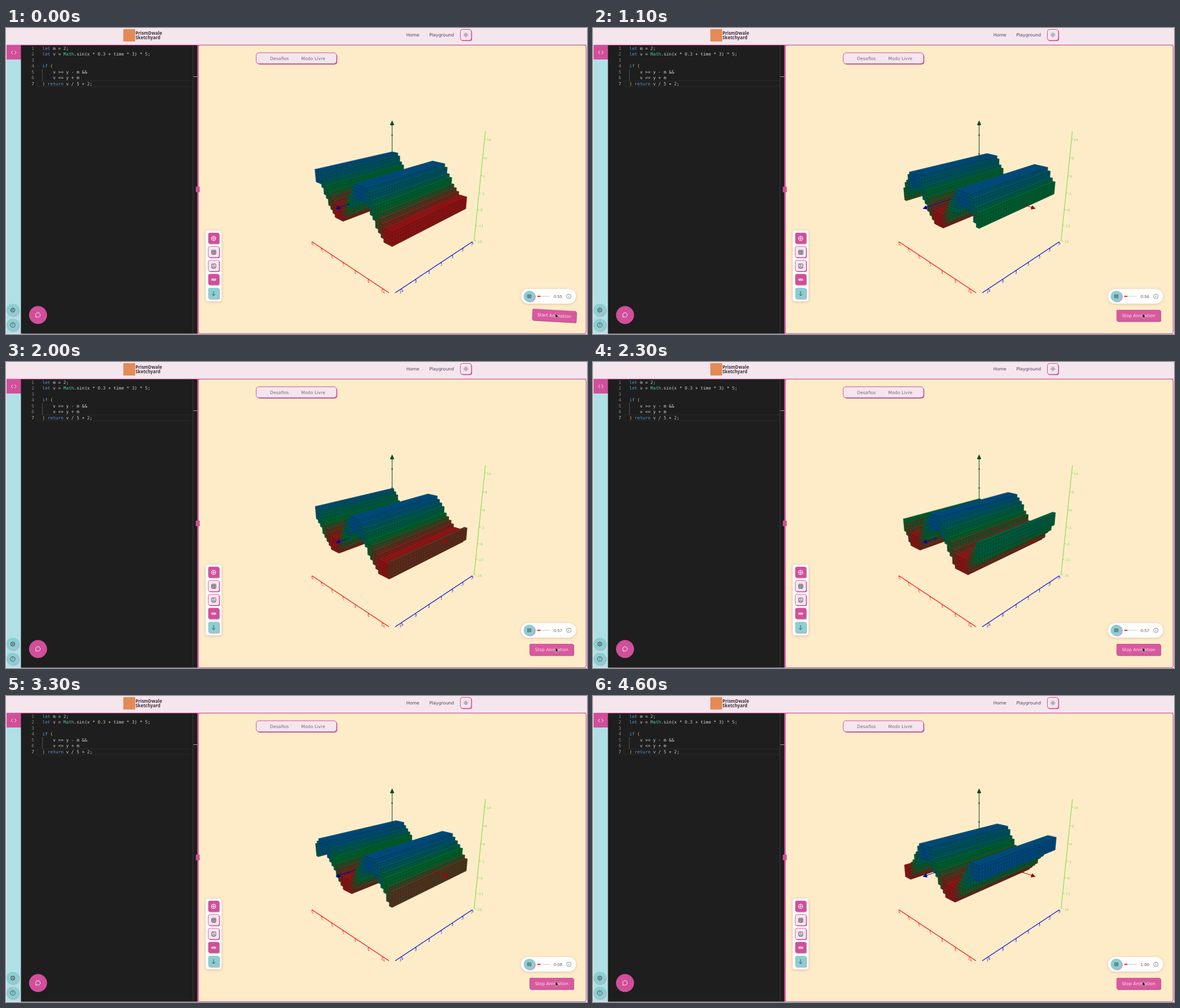
Write an HTML page with a canvas that moves like this. It is 1030 px wide and 544 px high and loops after 4.8 s.

```html
<!DOCTYPE html>
<html lang="pt">
<head>
<meta charset="utf-8">
<title>Voxel wave</title>
<style>
html, body { margin: 0; width: 100%; height: 100%; overflow: hidden; background: #f5e6ee; }
canvas { display: block; width: 1030px; height: 544px; }
</style>
</head>
<body>
<canvas id="stage" width="1030" height="544"></canvas>
<script>
const W = 1030, H = 544, LOOP = 4800;
const PINK = '#d14f9a', PALE = '#f5e6ee', TEAL = '#8acfd1', CREAM = '#feecc8', INK = '#4b414e';
const SANS = '"DejaVu Sans", sans-serif', MONO = '"DejaVu Sans Mono", monospace';
const stage = document.getElementById('stage').getContext('2d');
let g = stage;

// ---------- 2D helpers ----------
function box(x, y, w, h, r, fill, stroke, lw = 1) {
  g.beginPath();
  g.roundRect(x, y, w, h, r);
  if (fill) { g.fillStyle = fill; g.fill(); }
  if (stroke) { g.strokeStyle = stroke; g.lineWidth = lw; g.stroke(); }
}
function disc(x, y, r, fill, stroke, lw = 1) {
  g.beginPath();
  g.arc(x, y, r, 0, 7);
  if (fill) { g.fillStyle = fill; g.fill(); }
  if (stroke) { g.strokeStyle = stroke; g.lineWidth = lw; g.stroke(); }
}
function line(color, lw, ...pts) {
  g.beginPath();
  pts.forEach((p, i) => i ? g.lineTo(p[0], p[1]) : g.moveTo(p[0], p[1]));
  g.strokeStyle = color;
  g.lineWidth = lw;
  g.stroke();
}
function poly(fill, ...pts) {
  g.beginPath();
  pts.forEach(p => g.lineTo(p[0], p[1]));
  g.closePath();
  g.fillStyle = fill;
  g.fill();
}
function text(s, x, y, color, size = 7.8, align = 'center', font = SANS, weight = '') {
  g.font = `${weight} ${size}px ${font}`;
  g.textAlign = align;
  g.textBaseline = 'alphabetic';
  g.fillStyle = color;
  g.fillText(s, x, y);
}
function shadow(color, blur, dx, dy) {
  g.shadowColor = color; g.shadowBlur = blur;
  g.shadowOffsetX = dx; g.shadowOffsetY = dy;
}
const noShadow = () => shadow('transparent', 0, 0, 0);

// ---------- camera ----------
const F = 549, D = 95.85, S = 0.343, C = 0.939, R = Math.SQRT1_2;
function P(x, y, z) {
  const u = (x - z) * R, w = (x + z) * R, k = F / (D - w * C - y * S);
  return [684.5 + u * k, 287 - (y * C - w * S) * k];
}

// ---------- rulers ----------
const END = 18, OFF = 19.1, UNIT = 1.125;
function label(s, at, right, up, color) {
  const a = P(...at), b = P(...right), c = P(...up);
  g.save();
  g.transform((b[0] - a[0]) / 10, (b[1] - a[1]) / 10, (a[0] - c[0]) / 10, (a[1] - c[1]) / 10, a[0], a[1]);
  text(s, 0, 0, color, 11);
  g.restore();
}
function rulers() {
  const red = '#ff1010', blue = '#1010d8', green = '#8ee05a';
  line(red, 1.3, P(-END, -END, OFF), P(END, -END, OFF));
  line(blue, 1.3, P(OFF, -END, END), P(OFF, -END, -END));
  line(green, 1.3, P(OFF, -END, -OFF), P(OFF, END, -OFF));
  for (let n = -16; n <= 14; n += 5) {
    const q = n * UNIT, y = -END - 1.25;
    line(red, 1, P(q, -END, OFF), P(q, -END - 0.5, OFF));
    label(n, [q, y, OFF], [q + 1, y, OFF], [q, y + 1, OFF], red);
    line(blue, 1, P(OFF, -END, q), P(OFF, -END - 0.5, q));
    label(n, [OFF, y, q], [OFF, y, q - 1], [OFF, y + 1, q], blue);
    const p = P(OFF, q, -OFF);
    line(green, 1, p, [p[0] + 3, p[1] + 0.6]);
    text(n, p[0] + 3.5, p[1] + 3.6, green, 6.4, 'left');
  }
}

// ---------- interface ----------
function code() {
  const base = '#d4d4d4', key = '#569cd6', num = '#b5cea8', cls = '#4ec9b0', par = '#e8c35a';
  const rows = [
    [['let', key], [' m = '], ['2', num], [';']],
    [['let', key], [' v = '], ['Math', cls], ['.sin(x * '], ['0.3', num], [' + time * '], ['3', num], [') * '], ['5', num], [';']],
    [],
    [['if', key], [' '], ['(', par]],
    [['    v >= y - m &&']],
    [['    v <= y + m']],
    [[')', par], [' '], ['return', key], [' v / '], ['5', num], [' + '], ['2', num], [';']]
  ];
  box(55, 94, 276, 10, 0, null, '#2b2b2b');
  line('#505050', 1, [64.5, 73], [64.5, 94]);
  rows.forEach((row, i) => {
    const y = 38.7 + i * 10.55;
    text(i + 1, 50, y, i === 6 ? '#c6c6c6' : '#858585', 7.76, 'right', MONO);
    let x = 64.5;
    for (const [s, color = base] of row) {
      text(s, x, y, color, 7.76, 'left', MONO);
      x += g.measureText(s).width;
    }
  });
  line('#3a3a3a', 1, [331.5, 31], [331.5, 543]);
  line('#a8a8a8', 1, [332, 86.5], [339, 86.5]);
}
function tool(y, fill) {
  const pale = fill === PALE;
  box(359.7, y - 8.8, 19.5, 19.5, 3, pale ? PINK : '#b9acc0');
  box(358.5, y - 10, 19.5, 19.5, 3, fill, pale ? PINK : null, 0.8);
}
function sun(x, y) {
  disc(x, y, 1.9, null, INK, 0.9);
  rays(x, y, 3.2, 4.4, 0.8);
}
function rays(x, y, r1, r2, lw) {
  for (let i = 0; i < 8; i++) {
    const a = i * Math.PI / 4, c = Math.cos(a), s = Math.sin(a);
    line(INK, lw, [x + c * r1, y + s * r1], [x + c * r2, y + s * r2]);
  }
}
function sidebar() {
  box(1, 30, 26, 513, 0, '#b0e0e6');
  box(1, 31, 26, 25, 0, PINK);
  line('#fff', 0.9, [12, 40.5], [9.5, 43.5], [12, 46.5]);
  line('#fff', 0.9, [15.5, 40.5], [18, 43.5], [15.5, 46.5]);
  for (const y of [501.5, 528]) {
    disc(12.8, y + 0.8, 11.3, '#d88fbd');
    disc(12, y, 11.3, TEAL);
  }
  disc(12, 501.5, 3.4, null, INK, 1);
  disc(12, 501.5, 1.2, null, INK, 0.8);
  rays(12, 501.5, 3.4, 4.4, 1);
  disc(12, 528, 4.2, null, INK, 0.9);
  text('?', 12, 530.4, INK, 6.5);
}
function palette() {
  shadow('rgba(90,60,80,.25)', 5, 0, 1);
  box(354, 360, 28, 126, 4, '#fffafa');
  noShadow();
  tool(374, PINK);
  disc(368, 374, 4, null, '#fff', 0.9);
  line('#fff', 0.9, [364, 374], [372, 374]);
  line('#fff', 0.9, [368, 370], [368, 378]);
  tool(398.5, PALE);
  box(364.5, 395, 7.5, 7.5, 1, null, INK, 0.9);
  for (const d of [2.5, 5]) {
    line(INK, 0.8, [364.5 + d, 395], [364.5 + d, 402.5]);
    line(INK, 0.8, [364.5, 395 + d], [372, 395 + d]);
  }
  tool(423, PALE);
  box(364.5, 419.3, 7.5, 7.5, 1, null, INK, 0.8);
  box(366.4, 423.6, 3.7, 3.2, 0, null, INK, 0.7);
  line(INK, 0.7, [366.4, 419.5], [366.4, 421.2], [369.6, 421.2]);
  tool(447.3, PINK);
  box(364.5, 446, 7.5, 2.8, 0.8, '#e9a9cd', '#fff', 0.8);
  tool(472, TEAL);
  line(INK, 0.9, [368, 468], [368, 476]);
  line(INK, 0.9, [365, 473], [368, 476], [371, 473]);
}
function player() {
  shadow('rgba(90,60,80,.22)', 5, 0, 1);
  box(913, 464, 97.5, 26, 13, '#fffefd');
  noShadow();
  disc(929, 477.7, 10, '#d88fbd');
  disc(927.6, 477, 10, TEAL);
  box(924.8, 474, 2, 6, 0.4, null, INK, 0.9);
  box(928.6, 474, 2, 6, 0.4, null, INK, 0.9);
  line('#dedede', 1.6, [942, 477], [964, 477]);
  line('#f01020', 1.8, [942, 477], [947.3, 477]);
  disc(997.8, 477, 4, null, '#777', 0.8);
  line('#777', 0.9, [997.8, 476.4], [997.8, 479.2]);
  line('#777', 0.9, [997.8, 474.5], [997.8, 475.4]);
}
function chrome() {
  box(0, 0, W, H, 0, PALE);
  box(208, 2, 21, 22, 0, '#e58a55');
  text('PrismDwale', 229.5, 12, '#40323f', 7.9, 'left', '"Noto Sans", sans-serif', 'bold');
  text('Sketchyard', 229.5, 20, '#40323f', 7.9, 'left', '"Noto Sans", sans-serif', 'bold');
  text('Home', 721.3, 15.2, INK);
  text('Playground', 772.3, 15.2, INK);
  box(806.7, 3.7, 19.5, 19.5, 4, PINK);
  box(805.5, 2.5, 19.5, 19.5, 4, PALE, PINK);
  sun(815.3, 12.3);
  sidebar();
  box(26.5, 30, 313.5, 513.5, 0, '#1e1e1e');
  code();
  disc(56.8, 510.3, 16, PINK);
  g.beginPath();
  g.arc(56.7, 510, 4, 2.7, 8.3);
  g.lineTo(52.8, 514);
  g.closePath();
  g.strokeStyle = '#fff';
  g.lineWidth = 0.9;
  g.stroke();

  box(339, 30, 2, 513.5, 0, PINK);
  box(341, 30.5, 687.5, 513, 4, CREAM, PINK, 1.2);
  line(PINK, 1, [1, 30.3], [1029, 30.3]);
  box(336.5, 282, 7, 10, 1, PINK);
  box(444.8, 45.5, 142.5, 19.5, 5, PINK);
  box(443.5, 44, 142.5, 19.5, 5, PALE, PINK);
  text('Desafios', 484.7, 56.8, '#756a76');
  text('Modo Livre', 544.7, 56.8, '#756a76');
  palette();
  player();
  rulers();
}

// ---------- voxel wave ----------
const N = 16, E = N + 0.5;
const STOPS = [[146, 20, 22], [0, 100, 45], [0, 76, 130]];
function shade(v, light) {
  const q = Math.max(0, Math.min(2, v / 5 + 1)), i = Math.min(1, Math.floor(q));
  const rgb = STOPS[i].map((a, j) => Math.round((a + (STOPS[i + 1][j] - a) * (q - i)) * light));
  return `rgb(${rgb})`;
}
function face(color, ...pts) {
  poly(color, ...pts);
  g.strokeStyle = color;
  g.lineWidth = 0.5;
  g.stroke();
}
function seams(alpha, pairs) {
  g.beginPath();
  for (const [a, b] of pairs) { g.moveTo(...a); g.lineTo(...b); }
  g.strokeStyle = `rgba(0,0,0,${alpha})`;
  g.lineWidth = 0.6;
  g.stroke();
}
function column(x, v) {
  const lo = Math.ceil(v - 2) - 0.5, hi = Math.floor(v + 2) + 0.5, a = x - 0.5, b = x + 0.5;
  face(shade(v, 1.02), P(a, hi, -E), P(b, hi, -E), P(b, hi, E), P(a, hi, E));
  face(shade(v, 0.92), P(b, hi, -E), P(b, lo, -E), P(b, lo, E), P(b, hi, E));
  face(shade(v, 0.9), P(a, hi, E), P(b, hi, E), P(b, lo, E), P(a, lo, E));
  const top = [[P(a, hi, -E), P(a, hi, E)], [P(b, hi, -E), P(b, hi, E)]], side = [];
  for (let z = -E; z <= E; z++) {
    top.push([P(a, hi, z), P(b, hi, z)]);
    side.push([P(b, hi, z), P(b, lo, z)]);
  }
  for (let y = lo; y <= hi; y++) {
    side.push([P(b, y, -E), P(b, y, E)], [P(a, y, E), P(b, y, E)]);
  }
  seams(0.1, top);
  seams(0.2, side);
  return hi;
}

// ---------- axis arrows ----------
const TIP = 21.1, NECK = 19.9, AX = '#a00808', AY = '#0c4a22', AZ = '#0808a0';
function head(color, tip, neck) {
  const dx = tip[0] - neck[0], dy = tip[1] - neck[1], l = Math.hypot(dx, dy);
  const nx = -dy / l * 3.5, ny = dx / l * 3.5;
  poly(color, tip, [neck[0] + nx, neck[1] + ny], [neck[0] - nx, neck[1] - ny]);
  g.beginPath();
  g.ellipse(neck[0], neck[1], 1.2, 3.5, Math.atan2(dy, dx), 0, 7);
  g.fill();
}
function yAxis(from) {
  line(AY, 1, P(0, from, 0), P(0, NECK, 0));
  for (const y of [5.63, 11.25, 16.87]) if (y > from) disc(...P(0, y, 0), 1.3, AY);
}
function scene(phase) {
  const wave = x => Math.sin(x * 0.3 + phase) * 5;
  for (let x = -N; x <= N; x++) {
    const hi = column(x, wave(x));
    if (hi < 0 && x >= 0) line(AX, 1, P(x - 0.5, 0, 0), P(x + 0.5, 0, 0));
    if (x === 0) {
      if (hi < 0) line(AZ, 1, P(0, 0, 0), P(0, 0, E));
      yAxis(Math.max(0, hi));
    }
  }
  head(AY, P(0, TIP, 0), P(0, NECK, 0));
  line(AX, 1, P(E, 0, 0), P(NECK, 0, 0));
  disc(...P(16.87, 0, 0), 1.2, AX);
  head(AX, P(TIP, 0, 0), P(NECK, 0, 0));
  line(AZ, 1, P(0, 0, E), P(0, 0, NECK));
  disc(...P(0, 0, 16.87), 1.2, AZ);
  head(AZ, P(0, 0, TIP), P(0, 0, NECK));
}

// ---------- timeline ----------
// The wave speeds up slightly while running, with a few held stretches.
function running(t) {
  const s = t / 1000 - 1.1;
  return -1.73 + 2.5 * s + 0.3 * s * s;
}
function phaseAt(t) {
  if (t < 700) return 0.07;
  if (t < 900) return running(700);
  if (t < 3300) return running(Math.min(t, 2600));
  if (t < 3600) return running(Math.min(t, 3400));
  return t < 4600 ? -0.08 : 3.07;
}
function clockAt(t) {
  const s = 55 + [500, 1700, 2600, 3600, 4600].filter(m => t >= m).length;
  return Math.floor(s / 60) + ':' + String(s % 60).padStart(2, '0');
}
function button(t) {
  const [dx, deg] = t < 100 ? [4.8, 3.3] : t < 200 ? [-1.5, -1.2] : t < 300 ? [0.6, 0.5] : [0, 0];
  g.save();
  g.translate(967.2 + dx, 511.3);
  g.rotate(deg * Math.PI / 180);
  box(-38, -8.8, 78, 20, 2, '#b9578f');
  box(-39.2, -10.2, 78, 20, 2, '#d9599f');
  text(t < 700 ? 'Start Animation' : 'Stop Animation', 0, 2.6, '#fae3ef', 7.7);
  g.restore();
  poly('#111', [974, 507.5], [974, 515.8], [976, 514], [977.4, 517], [978.6, 516.4], [977.3, 513.6], [980, 513.4]);
  g.strokeStyle = '#fff';
  g.lineWidth = 0.5;
  g.stroke();
}

const still = document.createElement('canvas');
still.width = W;
still.height = H;
g = still.getContext('2d');
chrome();
g = stage;

const start = performance.now();
function draw() {
  const t = Math.floor((performance.now() - start) % LOOP / 100) * 100;
  g.drawImage(still, 0, 0);
  scene(phaseAt(t));
  text(clockAt(t), 978.5, 479.6, '#555', 6.9);
  button(t);
  requestAnimationFrame(draw);
}
draw();
</script>
</body>
</html>
```
